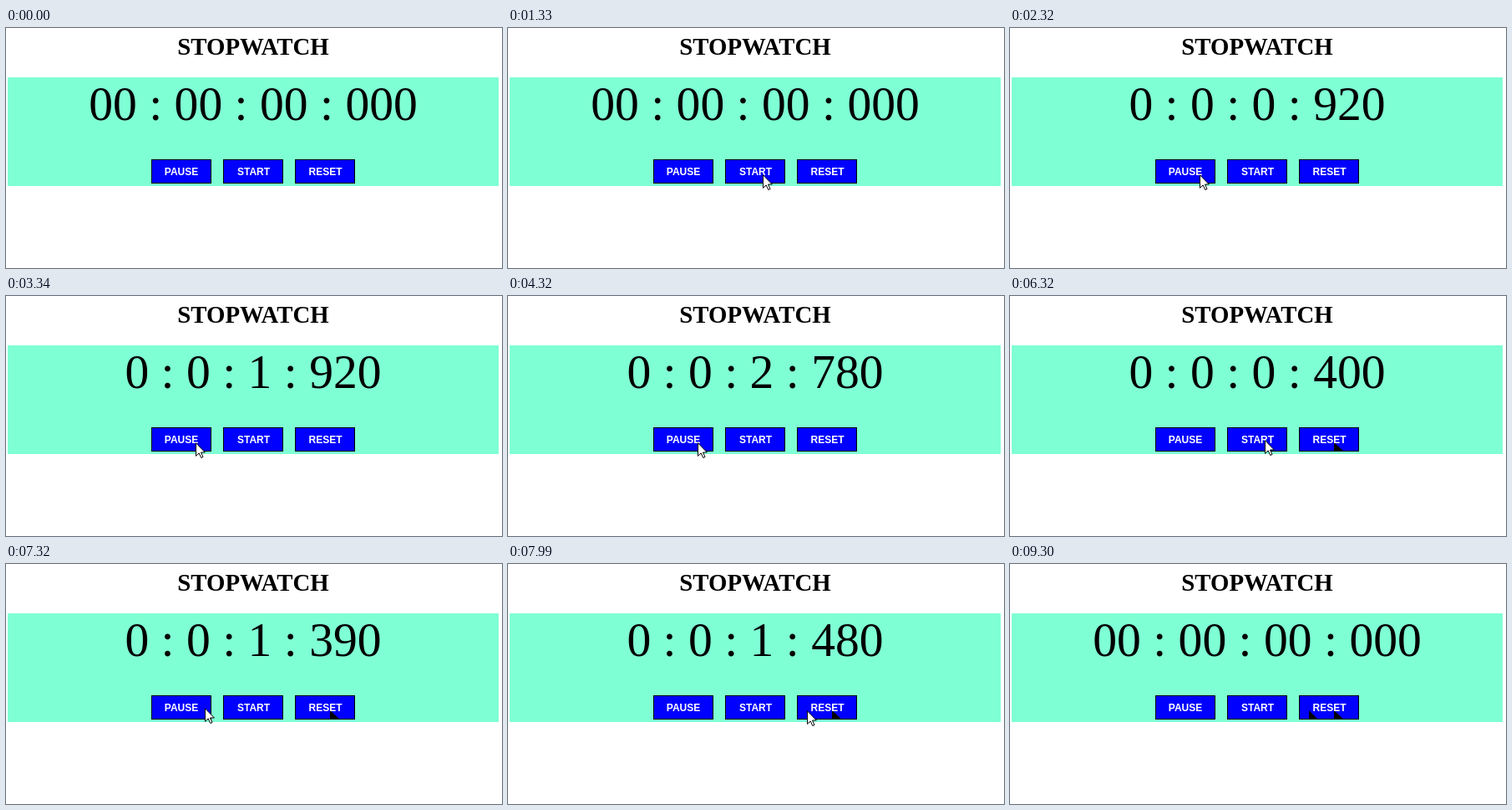
An HTML page that plays this animation: 594 by 287 pixels, repeating every 9970 ms.

```html
<!DOCTYPE html>
<html lang="en">
<head>
<meta charset="utf-8">
<title>Stopwatch</title>
<style>
  html, body { margin: 0; width: 100%; height: 100%; overflow: hidden; background: #fff; }
  svg { display: block; width: 594px; height: 287px; }
  text { text-anchor: middle; }
  .serif { font-family: "Liberation Serif", "Times New Roman", serif; }
  .title { font-size: 28.8px; font-weight: bold; }
  .time { font-size: 57.6px; }
  .button rect { fill: #00f; stroke: #000; }
  .button text { font: bold 12px "Liberation Sans", Arial, sans-serif; fill: #fff; }
</style>
</head>
<body>
<svg viewBox="0 0 594 287">
  <text class="serif title" x="296" y="32">STOPWATCH</text>
  <rect x="2" y="59" width="588" height="130" fill="#7fffd4"/>
  <text class="serif time" id="time" x="296" y="110.4"></text>
  <g class="button" transform="translate(174 157)">
    <rect x=".5" y=".5" width="71" height="28"/>
    <text x="36" y="19">PAUSE</text>
  </g>
  <g class="button" transform="translate(260 157)">
    <rect x=".5" y=".5" width="71" height="28"/>
    <text x="36.5" y="19">START</text>
  </g>
  <g class="button" transform="translate(346 157)">
    <rect x=".5" y=".5" width="71" height="28"/>
    <path id="trailLeft" d="M12 18v11h11z"/>
    <path id="trailRight" d="M42 18v11h12z"/>
    <text x="36.5" y="19">RESET</text>
  </g>
  <path id="arrow" d="M.5 .8V16.4L4.2 12.9L6.8 18.5L9 17.5L6.5 12H11.4Z" fill="#fff" stroke="#000"/>
  <path id="beam" d="M-3 .5H-1L.5 1.5L2 .5H4M.5 1.5V14.5M-3 15.5H-1L.5 14.5L2 15.5H4" fill="none" stroke="#000"/>
</svg>
<script>
  const LOOP = 9970;
  const RESET = -1;

  // start ms, stopwatch ms, pointer x, pointer y, pointer shape
  const steps = [
    [0, RESET],
    [330, RESET, 337, 230, "arrow"],
    [660, RESET, 318, 203, "arrow"],
    [1000, RESET, 310, 182, "arrow"],
    [1330, RESET, 305, 175, "arrow"],
    [1660, 260, 305, 175, "arrow"],
    [1990, 590, 270, 175, "arrow"],
    [2320, 920, 227, 175, "arrow"],
    [2670, 1260, 227, 175, "arrow"],
    [3000, 1590, 227, 175, "arrow"],
    [3330, 1920, 227, 175, "arrow"],
    [3660, 2250, 227, 175, "arrow"],
    [3990, 2580, 227, 175, "arrow"],
    [4320, 2780, 227, 175, "arrow"],
    [4650, 2780, 388, 175, "arrow"],
    [4980, RESET, 388, 175, "arrow"],
    [5310, RESET, 343, 166, "beam"],
    [5640, RESET, 305, 172, "arrow"],
    [5980, 70, 305, 172, "arrow"],
    [6320, 400, 305, 172, "arrow"],
    [6650, 730, 305, 172, "arrow"],
    [6980, 1060, 262, 172, "arrow"],
    [7320, 1390, 238, 172, "arrow"],
    [7650, 1480, 238, 172, "arrow"],
    [7990, 1480, 358, 175, "arrow"],
    [8320, RESET, 367, 175, "arrow"],
    [9300, RESET]
  ];

  const byId = id => document.getElementById(id);
  const time = byId("time");
  const show = (id, on) => byId(id).setAttribute("visibility", on ? "visible" : "hidden");

  const format = ms => ms === RESET
    ? "00 : 00 : 00 : 000"
    : `0 : 0 : ${Math.floor(ms / 1000)} : ${ms % 1000}`;

  let current;

  function render(step) {
    const [start, ms, x, y, shape] = step;
    time.textContent = format(ms);
    for (const id of ["arrow", "beam"]) {
      show(id, id === shape);
      if (id === shape) byId(id).setAttribute("transform", `translate(${x} ${y})`);
    }
    show("trailRight", start >= 5310);
    show("trailLeft", start >= 8320);
  }

  function tick() {
    const t = performance.now() % LOOP;
    const step = steps.findLast(([start]) => start <= t);
    if (step !== current) render(current = step);
    requestAnimationFrame(tick);
  }
  tick();
</script>
</body>
</html>
```
